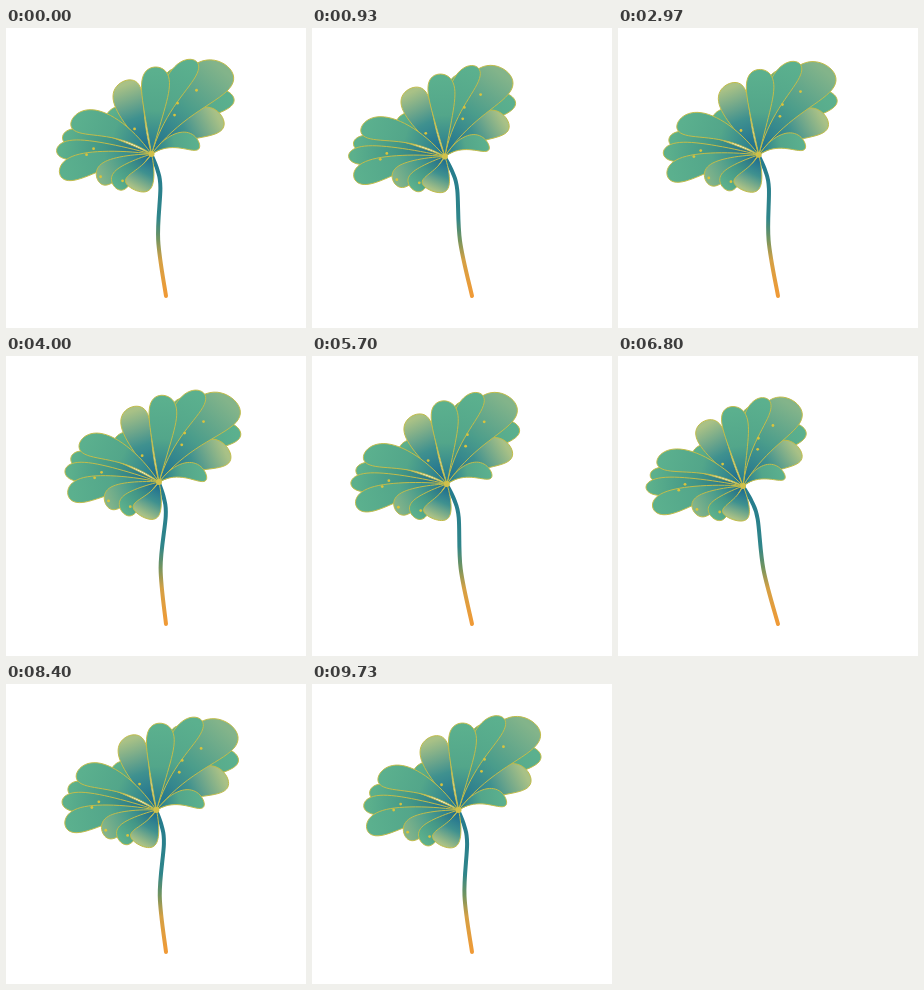
An HTML page with a canvas for the animation above (9.81 s loop, 300 by 300 pixels).

```html
<!DOCTYPE html>
<html lang="en">
<head>
<meta charset="utf-8">
<title>Swaying lotus leaf</title>
<style>
  html, body { margin: 0; width: 100%; height: 100%; overflow: hidden; background: #fff; }
  canvas { display: block; width: 300px; height: 300px; }
</style>
</head>
<body>
<canvas id="stage" width="300" height="300"></canvas>
<script>
const ctx = document.getElementById('stage').getContext('2d');
const SWAY = 4905, STEP = 70, PEAK = 3950;
const HEART = { x: 145, y: 126 }, ROOT = { x: 160, y: 268 };

// Colours from the heart of the leaf to the rim.
const GREEN = ['#2b7f8f', '#53a68a', '#5bb08e'];
const TEAL = ['#246f8c', '#429686', '#5cb08c'];
const PALE = ['#1f6f90', '#3f918f', '#a9c186'];
const MIST = ['#26788f', '#4b9d8b', '#83b48a'];
const GOLD = '#c2bc4a';

// Back to front: tip of the lobe, half width, sideways bow, colours.
const lobes = [
  [226, 67, 13, -10, GREEN],
  [216, 89, 15, -6, PALE],
  [193, 116, 9, -8, GREEN],
  [221, 38, 21, -9, MIST],
  [169, 41, 8, -3, TEAL],
  [188, 32, 12, -8, GREEN],
  [103, 83, 12, 4, TEAL],
  [118, 53, 15, -4, PALE],
  [150, 39, 14, 0, GREEN],
  [56, 109, 10, 2, TEAL],
  [50, 123, 10, 2, TEAL],
  [53, 146, 12, 4, GREEN],
  [91, 152, 11, 3, MIST],
  [108, 159, 10, 2, TEAL],
  [126, 161, 13, -4, PALE],
  [65, 93, 13, 9, GREEN]
].map(([x, y, width, bow, tones]) => ({ tones, outline: lobeOutline(x, y, width, bow) }));

const stem = [[145, 127], [151, 142], [154, 160], [152, 212], [160, 268]];
const specks = [[128, 101], [171, 75], [190, 62], [168, 87], [80, 127], [87, 121], [116, 153], [94, 149]];

// A round-headed lobe that widens along a bowed spine.
function lobeOutline(x, y, width, bow) {
  const dx = x - HEART.x, dy = y - HEART.y, length = Math.hypot(dx, dy);
  const nx = -dy / length, ny = dx / length, sides = 24;
  const points = [];
  for (let i = -sides; i <= sides; i++) {
    const u = Math.cos(i / sides * Math.PI / 2);
    const half = Math.sign(i) * 1.45 * width * u * Math.sqrt(1 - u ** 6);
    const offset = half + 4 * bow * u * (1 - u);
    points.push([HEART.x + dx * u + nx * offset, HEART.y + dy * u + ny * offset]);
  }
  return points;
}

// Sideways shift of the heart: a slow wave that lingers near its right end.
function swayAt(t) {
  const phase = (t - PEAK) / SWAY * 2 * Math.PI;
  return -6 + 14 * Math.cos(phase - 0.21 * (1 - Math.cos(phase)));
}

// The stem bends from its root.
function bendStem([x, y], sway) {
  const height = (ROOT.y - y) / (ROOT.y - HEART.y);
  return [x + sway * height ** 1.2, y + 4 * height * Math.max(0, -sway / 20)];
}

// The leaf folds when swaying left and tips over when swaying right.
function bendLeaf([px, py], sway) {
  const x = px - HEART.x, y = py - HEART.y;
  const fold = Math.max(0, -sway / 20), tip = Math.max(0, sway / 8);
  return [
    px + sway + fold * (0.17 * y - 0.06 * x - 0.0008 * x * x) - 0.01 * tip * x,
    py + fold * (4 - 0.05 * x - 0.09 * y) + 0.08 * tip * x
  ];
}

function gradient(from, to, stops) {
  const g = ctx.createLinearGradient(...from, ...to);
  stops.forEach(([at, color]) => g.addColorStop(at, color));
  return g;
}

function stroke(style, width) {
  ctx.strokeStyle = style;
  ctx.lineWidth = width;
  ctx.stroke();
}

function dot([x, y], radius, color) {
  ctx.fillStyle = color;
  ctx.beginPath();
  ctx.arc(x, y, radius, 0, 7);
  ctx.fill();
}

function drawStem(sway) {
  const points = stem.map(p => bendStem(p, sway));
  ctx.beginPath();
  ctx.moveTo(...points[0]);
  for (let i = 0; i < points.length - 1; i++) {
    const b = points[i], c = points[i + 1];
    const a = points[i - 1] || b, d = points[i + 2] || c;
    ctx.bezierCurveTo(
      b[0] + (c[0] - a[0]) / 6, b[1] + (c[1] - a[1]) / 6,
      c[0] - (d[0] - b[0]) / 6, c[1] - (d[1] - b[1]) / 6, ...c);
  }
  stroke(gradient([0, HEART.y], [0, ROOT.y], [
    [0, '#237a8e'], [0.45, '#2f858a'], [0.6, '#72945f'], [0.75, '#d5a044'], [1, '#f09a36']
  ]), 4);
}

function draw(t) {
  const sway = swayAt(t), bend = p => bendLeaf(p, sway);
  const heart = bend([HEART.x, HEART.y]);
  ctx.fillStyle = '#fff';
  ctx.fillRect(0, 0, 300, 300);
  ctx.lineCap = ctx.lineJoin = 'round';
  drawStem(sway);

  for (const { tones, outline } of lobes) {
    const shape = outline.map(bend), tip = shape[(shape.length - 1) / 2];
    ctx.beginPath();
    shape.forEach(p => ctx.lineTo(...p));
    ctx.closePath();
    ctx.fillStyle = gradient(heart, tip, [[0.1, tones[0]], [0.5, tones[1]], [0.95, tones[2]]]);
    ctx.fill();
    stroke(GOLD, 1);
  }
  specks.forEach(p => dot(bend(p), 1.4, '#d9c33c'));
  dot(heart, 3, '#cfc04b');
}

function tick(now) {
  draw(Math.floor(now % (2 * SWAY) / STEP) * STEP);
  requestAnimationFrame(tick);
}
requestAnimationFrame(tick);
</script>
</body>
</html>
```
